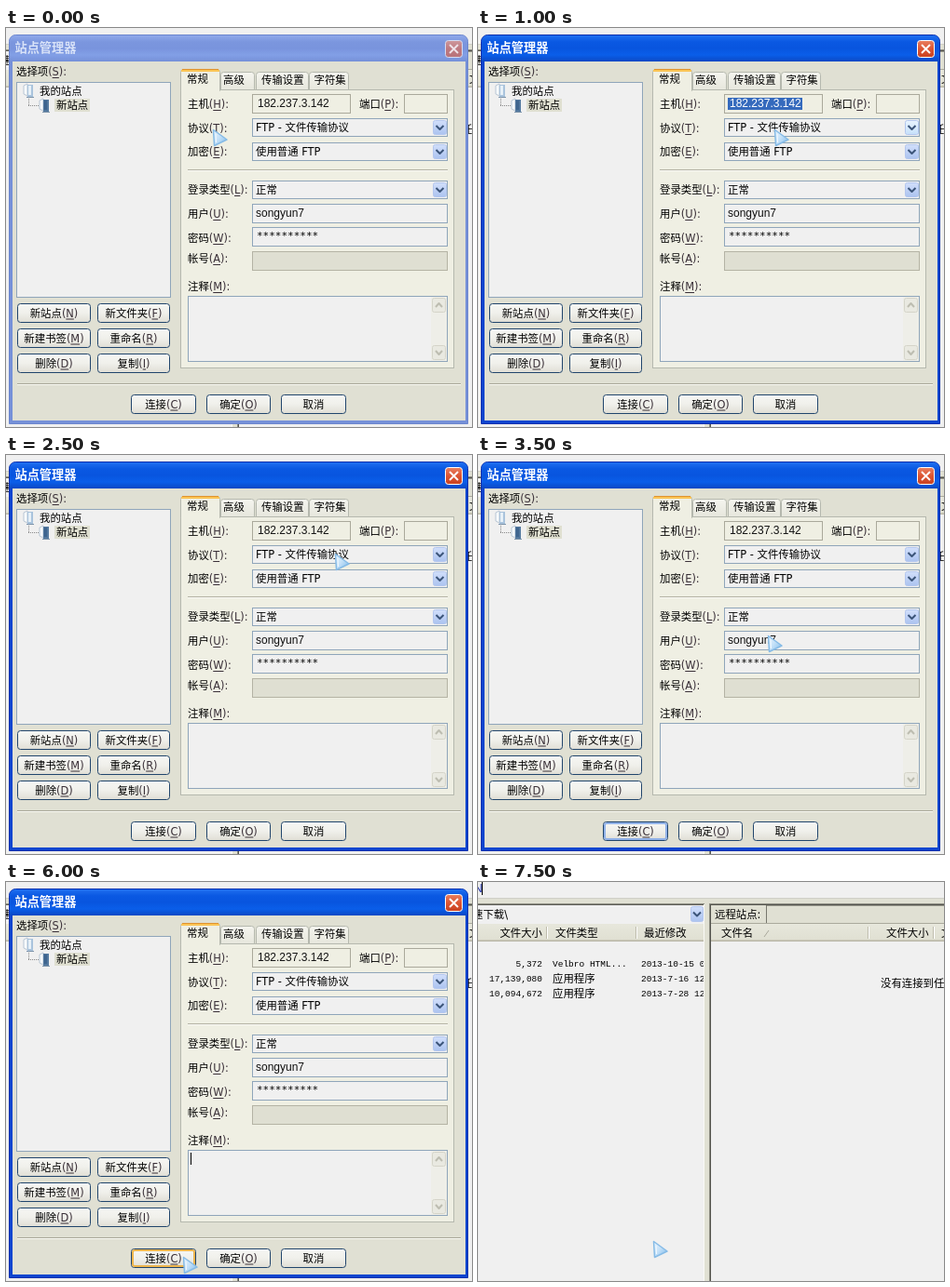
An HTML page with a canvas that plays this animation: 500x429 px, repeating every 8000 ms.

```html
<!DOCTYPE html>
<html lang="zh-CN">
<head>
<meta charset="utf-8">
<style>
html, body { margin: 0; width: 100%; height: 100%; overflow: hidden; background: #f0f0f0; }
canvas { display: block; width: 500px; height: 429px; }
</style>
</head>
<body>
<canvas id="stage" width="500" height="429"></canvas>
<script>
const ctx = document.getElementById('stage').getContext('2d');
const LOOP = 8000, STEP = 500;
const UI = '500 11.4px "DejaVu Sans", "Noto Sans CJK SC", "Noto Sans CJK", sans-serif';
const FIELD = '12px "Liberation Sans", sans-serif';
const LIST = '9.5px "Liberation Mono", monospace';
const STARS = '11px "DejaVu Sans Mono", monospace';
const FACE = '#e0e0d3', PAPER = '#f0f0f0', PANEL = '#efefe3', EDGE = '#8fa5ba';

// Pointer tip for each half second.
const POINTER = [
  [222, 109], [239, 69], [318, 109], [456, 105], [461, 130], [353, 106],
  [456, 172], [311, 194], [346, 224], [314, 283], [307, 307], [240, 390],
  [190, 403], [189, 404], [189, 404], [188, 386]
];

function rect(x, y, w, h, fill) {
  ctx.fillStyle = fill;
  ctx.fillRect(x, y, w, h);
}

function box(x, y, w, h, fill, edge) {
  rect(x, y, w, h, edge);
  rect(x + 1, y + 1, w - 2, h - 2, fill);
}

function round(x, y, w, h, r, fill, edge) {
  ctx.beginPath();
  ctx.roundRect(x + .5, y + .5, w - 1, h - 1, r);
  if (fill) { ctx.fillStyle = fill; ctx.fill(); }
  if (edge) { ctx.strokeStyle = edge; ctx.lineWidth = 1; ctx.stroke(); }
}

function fade(y0, y1, ...colors) {
  const g = ctx.createLinearGradient(0, y0, 0, y1);
  colors.forEach((c, i) => g.addColorStop(i / (colors.length - 1), c));
  return g;
}

function poly(points, color, width, fill) {
  ctx.beginPath();
  points.forEach(([x, y]) => ctx.lineTo(x, y));
  if (fill) { ctx.closePath(); ctx.fillStyle = fill; ctx.fill(); }
  ctx.lineJoin = 'round';
  ctx.strokeStyle = color;
  ctx.lineWidth = width;
  ctx.stroke();
}

// y is the middle of the line.
function text(s, x, y, { font = UI, color = '#000', align = 'left' } = {}) {
  ctx.font = font;
  ctx.fillStyle = color;
  ctx.textAlign = align;
  ctx.fillText(s, x, y + 4);
}

// Underlines the access key inside the parentheses.
function label(s, x, y) {
  const at = s.indexOf('(') + 1;
  if (!at) return text(s, x, y);
  const name = s.slice(0, at - 1);
  text(name, x, y);
  const keyX = x + ctx.measureText(name).width;
  text(s.slice(at - 1), keyX, y, { color: '#3a3038' });
  rect(keyX + ctx.measureText('(').width, y + 6, ctx.measureText(s[at]).width, 1, '#3a3038');
}

function arrowButton(x, y, w, h, hover) {
  round(x, y, w, h, 2, hover ? fade(y, y + h, '#eaf5ff', '#c5dffa') : fade(y, y + h, '#d3e0fb', '#aac2ef'), '#b3c6ee');
  const cx = x + w / 2, cy = y + h / 2 + 2;
  poly([[cx - 4, cy - 4], [cx, cy], [cx + 4, cy - 4]], '#3b5479', 2);
}

function combo(y, s, hover) {
  box(264, y, 210, 20, PAPER, EDGE);
  arrowButton(458, y + 2, 15, 16, hover);
  text(s, 268, y + 10);
}

function button(s, x, y, w, state) {
  round(x, y, w, 21, 3, fade(y, y + 21, '#f7f7f4', '#f0f0eb', '#dfddd4'), '#21456c');
  if (state) {
    ctx.beginPath();
    ctx.roundRect(x + 2, y + 2, w - 4, 17, 2);
    ctx.strokeStyle = state === 'hover' ? '#edb54d' : '#91b2e8';
    ctx.lineWidth = 2;
    ctx.stroke();
  }
  ctx.font = UI;
  label(s, x + (w - ctx.measureText(s).width) / 2, y + 10.5);
}

function caret(x, y, h = 14) { rect(x, y, 1, h, '#000'); }

function columns(x, w) {
  rect(x, 45, w, 19, fade(45, 64, '#e7e7dc', '#dfdfd1'));
  rect(x, 62, w, 1, '#cac8b8');
  rect(x, 63, w, 1, '#b9b7a8');
}

function divider(x) {
  rect(x, 48, 1, 13, '#bdbbab');
  rect(x + 1, 48, 1, 13, '#fff');
}

function mainWindow(typing) {
  rect(0, 0, 500, 429, PAPER);
  rect(0, 17, 500, 1, '#cfcfc7');
  rect(0, 18, 500, 6, FACE);
  rect(242, 18, 8, 411, FACE);
  rect(0, 23, 243, 1, '#8b8b80');
  rect(0, 24, 243, 1, '#5e5e58');
  arrowButton(228, 26, 14, 17);
  text('速下载\\', -6, 35);
  columns(0, 242);
  text('文件大小', 69, 55, { align: 'right' });
  text('文件类型', 83, 55);
  text('最近修改', 178, 55);
  divider(73);
  divider(169);

  ctx.save();
  ctx.beginPath();
  ctx.rect(0, 64, 242, 100);
  ctx.clip();
  [
    ['5,372', 'Velbro HTML...', '2013-10-15 09'],
    ['17,139,080', '应用程序', '2013-7-16 12:'],
    ['10,094,672', '应用程序', '2013-7-28 12:']
  ].forEach(([size, type, date], i) => {
    const y = 88 + i * 16;
    text(size, 69, y - 1, { font: LIST, align: 'right' });
    text(type, 80, y - (i ? 0 : 1), { font: i ? UI : LIST });
    text(date, 175, y - 1, { font: LIST });
  });
  ctx.restore();

  rect(242, 24, 1, 405, '#fafaf6');
  rect(248, 23, 252, 1, '#8b8b80');
  rect(248, 23, 1, 406, '#8b8b80');
  rect(249, 24, 1, 405, '#55554f');
  rect(249, 24, 251, 1, '#55554f');
  rect(250, 25, 250, 20, FACE);
  rect(309, 25, 1, 19, '#77776d');
  rect(310, 25, 190, 1, '#9a9a8e');
  rect(250, 44, 250, 1, '#aaa99c');
  text('远程站点:', 254, 35);
  columns(250, 250);
  text('文件名', 261, 55);
  poly([[307, 59], [312, 52]], '#aaa99c', 1);
  text('文件大小', 438, 55);
  text('文件类型', 497, 55);
  divider(418);
  divider(488);
  text('没有连接到任何服务器', 432, 109);

  if (typing) {
    text('N', -4, 7, { font: FIELD, color: '#2233a8' });
    caret(4, 0);
  }
}

function serverIcon(x, y, dark) {
  poly([[x, y + 2], [x + 4, y], [x + 4, y + 13], [x, y + 11]], '#b9c6d4', 1, '#f7fafc');
  rect(x + 4, y + 1, 6, 13, dark ? '#54799f' : '#a9c3dc');
  rect(x + 5, y + 2, 3, 10, dark ? '#3f658f' : '#e7f0f7');
  rect(x + 3, y + 14, 8, 1, '#7d94aa');
}

function frame(active) {
  round(3, 7, 493, 419, [7, 7, 0, 0], active ? '#0d45cf' : '#7590d8', active ? '#0a2fae' : '#6b85cd');
  ctx.beginPath();
  ctx.roundRect(4, 8, 491, 28, [6, 6, 0, 0]);
  ctx.fillStyle = active
    ? fade(8, 36, '#1f6ff0', '#0a58e2', '#0855df', '#0a5ee9', '#0a48c4')
    : fade(8, 36, '#8fa8ea', '#7b96de', '#7994dd', '#829fe6', '#7590d8');
  ctx.fill();
  rect(7, 36, 486, 386, FACE);
  text('站点管理器', 9.5, 22, {
    font: 'bold 13.2px "Noto Sans CJK SC", "Noto Sans CJK", sans-serif',
    color: active ? '#fff' : '#d8e2f8'
  });
  round(471, 13, 19, 19, 3, active ? fade(13, 32, '#ea8263', '#dc5533', '#c7401f') : fade(13, 32, '#cf9b9f', '#be7980', '#b8737a'), active ? '#fff' : '#d5dcf2');
  const cross = active ? '#fff' : '#eee2e8';
  poly([[476, 18], [485, 27]], cross, 2);
  poly([[485, 18], [476, 27]], cross, 2);
}

function sitePane() {
  label('选择项(S):', 11, 47);
  box(11, 58, 166, 232, PAPER, EDGE);
  serverIcon(19, 60, false);
  text('我的站点', 36, 68);
  for (let y = 76; y < 84; y += 2) rect(24, y, 1, 1, '#888');
  for (let x = 24; x < 35; x += 2) rect(x, 83, 1, 1, '#888');
  serverIcon(36, 76, true);
  rect(52, 76, 38, 14, '#dfdfd0');
  text('新站点', 54, 83);
  ['新站点(N)', '新文件夹(F)', '新建书签(M)', '重命名(R)', '删除(D)', '复制(I)'].forEach((s, i) => {
    const right = i % 2;
    button(s, right ? 98 : 12, [296, 323, 350][i >> 1], right ? 78 : 79);
  });
}

function tabs() {
  const edge = '#b5b8ae';
  box(187, 66, 294, 300, PANEL, edge);
  [['高级', 230, 37, 233], ['传输设置', 268, 57, 274], ['字符集', 325, 43, 330.5]].forEach(([s, x, w, tx]) => {
    round(x, 47, w, 20, [3, 3, 0, 0], fade(47, 67, '#f5f5ef', '#e6e6dc'), edge);
    text(s, tx, 55.5);
  });
  round(187, 44, 43, 24, [3, 3, 0, 0], PANEL, edge);
  rect(188, 66, 41, 3, PANEL);
  rect(189, 44, 39, 1, '#df9230');
  rect(188, 45, 41, 2, '#fac455');
  text('常规', 194, 54.5);
}

function form(step) {
  [['主机(H):', 82], ['协议(T):', 108], ['加密(E):', 133], ['登录类型(L):', 174],
   ['用户(U):', 200], ['密码(W):', 226], ['帐号(A):', 248], ['注释(M):', 278]]
    .forEach(([s, y]) => label(s, 195, y));
  label('端口(P):', 379, 82);

  box(264, 71, 106, 21, PANEL, '#aaa99b');
  box(427, 71, 47, 21, PANEL, '#aaa99b');
  const selected = step === 2;
  if (selected) rect(268, 75, 80, 13, '#356abd');
  text('182.237.3.142', 270, 81, { font: FIELD, color: selected ? '#fff' : '#111' });

  combo(97, 'FTP - 文件传输协议', step === 2);
  combo(123, '使用普通 FTP');
  rect(195, 152, 279, 1, '#b3b2a3');
  rect(195, 153, 279, 1, '#fafaf5');
  combo(164, '正常');
  box(264, 189, 210, 21, PAPER, EDGE);
  text('songyun7', 268, 199, { font: FIELD, color: '#111' });
  box(264, 214, 210, 21, PAPER, EDGE);
  text('*'.repeat(10), 269, 223, { font: STARS });
  box(264, 240, 210, 21, '#dfdfd2', '#b4b3a4');
  box(195, 288, 279, 71, PAPER, EDGE);

  rect(456, 289, 17, 69, '#eeeee8');
  for (const [y, dir] of [[290, -1], [341, 1]]) {
    round(457, y, 15, 16, 2, '#e9e9e1', '#d5d4c9');
    const cy = y + 8;
    poly([[461, cy - 2 * dir], [464.5, cy + 2 * dir], [468, cy - 2 * dir]], '#bdbdb1', 2);
  }

  if (step === 9) caret(335, 217);
  if (step === 10 || step === 12) caret(198, 291, 13);
}

function dialog(step) {
  frame(step > 1);
  sitePane();
  tabs();
  form(step);
  rect(12, 382, 476, 1, '#a9a89a');
  rect(12, 383, 476, 1, '#fafaf4');
  button('连接(C)', 134, 394, 70, step === 12 ? 'hover' : step >= 7 ? 'default' : '');
  button('确定(O)', 215, 394, 69);
  button('取消', 295, 394, 70);
}

function pointer([x, y]) {
  ctx.save();
  ctx.translate(x, y);
  const fill = ctx.createLinearGradient(0, 4, 14, 14);
  fill.addColorStop(0, '#e6f3fd');
  fill.addColorStop(.5, '#c3e0f8');
  fill.addColorStop(1, '#8fc4ee');
  poly([[.5, .5], [15, 11], [1.5, 17.5]], '#86bbe6', 1.5, fill);
  poly([[3, 5], [3.5, 14]], '#f3faff', 1);
  ctx.restore();
}

function draw(now) {
  const step = Math.floor((now % LOOP) / STEP);
  mainWindow(step === 15);
  if (step < 13) dialog(step);
  pointer(POINTER[step]);
  requestAnimationFrame(draw);
}

requestAnimationFrame(draw);
</script>
</body>
</html>
```
